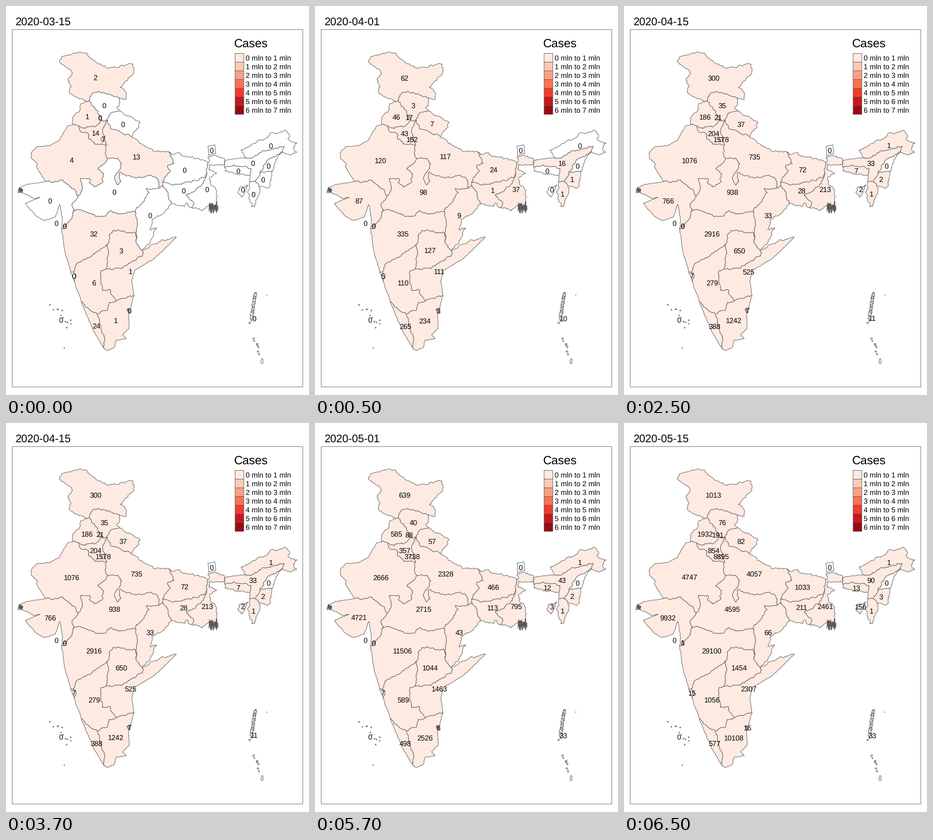
Animation of 660x849 px, one loop 8000 ms. Source, as a matplotlib script:

```python
import numpy as np
import matplotlib.pyplot as plt
from matplotlib.animation import FuncAnimation
from matplotlib.patches import Polygon, Rectangle

W, H, DPI = 660, 849, 100
INK = "#585858"
REDS = ["#feeae1", "#fdcab5", "#fc9f81", "#fb7252", "#ef3c2d", "#c8171c", "#980a13"]
DATES = ["2020-03-15", "2020-04-01", "2020-04-15", "2020-05-01", "2020-05-15"]

plt.rcParams.update({"font.family": "Liberation Sans", "text.hinting": "none"})
fig = plt.figure(figsize=(W / DPI, H / DPI), dpi=DPI, facecolor="white")
ax = fig.add_axes([0, 0, 1, 1])
ax.set(xlim=(0, W), ylim=(H, 0))
ax.axis("off")


def px(size):
    return size * 72 / DPI


def label(x, y, text, size, **kw):
    return ax.text(x, y, text, fontsize=px(size), color="black", zorder=5, **kw)


def box(x, y, w, h, **kw):
    ax.add_patch(Rectangle((x, y), w, h, lw=px(1), snap=False, **kw))


def arc(*xy, rough=0.28):
    """Line through key points, roughened by capped midpoint displacement."""
    pts = np.array(xy, float).reshape(-1, 2)
    rng = np.random.default_rng(int(pts.sum()))
    while True:
        step = np.diff(pts, axis=0)
        length = np.hypot(*step.T)
        split = length > 3.2
        if not split.any():
            return pts
        size = np.minimum(rough * length, 7 * rough) * rng.uniform(-1, 1, len(length))
        normal = np.column_stack([-step[:, 1], step[:, 0]]) / length[:, None]
        mid = (pts[:-1] + pts[1:]) / 2 + normal * size[:, None]
        pts = np.insert(pts, np.flatnonzero(split) + 1, mid[split], axis=0)


def coast(*xy):
    return arc(*xy, rough=0.1)


def gap(a, b):
    return np.hypot(*(a - b))


def ring(first, *rest):
    """Join arcs end to end, turning each one round where needed."""
    if rest:
        ends = rest[0][[0, -1]]
        if min(gap(first[0], e) for e in ends) < min(gap(first[-1], e) for e in ends):
            first = first[::-1]
    out = [first]
    for a in rest:
        tail = out[-1][-1]
        out.append(a[::-1] if gap(a[-1], tail) < gap(a[0], tail) else a)
    return np.vstack(out)


def shape(points):
    return ax.add_patch(Polygon(points, fc="white", ec=INK, lw=px(1), joinstyle="round", zorder=2))


def islet(x, y, w, h):
    t = np.linspace(0, 2 * np.pi, 14, endpoint=False)
    r = np.random.default_rng(int(x * 7 + y)).uniform(0.6, 1.1, 14) / 2
    return np.column_stack([x + w * r * np.cos(t), y + h * r * np.sin(t)])


def chain(start, end, n, spread, w, h, seed):
    """Islets scattered along a line, each with a random size up to w by h."""
    rng = np.random.default_rng(seed)
    centres = np.linspace(start, end, n) + rng.uniform(-spread, spread, (n, 2))
    return [islet(x, y, *rng.uniform(0.5, 1, 2) * (w, h)) for x, y in centres]


def creeks(x0, y0, x1, y1, n):
    """Tangle of up and down strokes for a marshy shore."""
    rng = np.random.default_rng(n)
    x = np.linspace(x0, x1, n) + rng.normal(0, 0.8, n)
    y = np.where(np.arange(n) % 2, y0, y1) + rng.uniform(-0.4, 0.4, n) * (y1 - y0)
    ax.plot(x, y, color=INK, lw=px(1), zorder=3)


regions = []


def region(x, y, counts, *arcs, islets=()):
    patches = [shape(p) for p in ([ring(*arcs)] if arcs else []) + list(islets)]
    regions.append((label(x, y + 5.4, "", 15.5, ha="center"), counts, patches))


# Northern borders
jk_out = arc(246, 200, 262, 203, 259, 187, 249, 177, 277, 149, 277, 127, 255, 130, 225, 136,
             190, 118, 177, 104, 158, 101, 121, 111, 118, 124, 145, 147, 135, 160, 142, 176,
             139, 190, 158, 201, 172, 206, 181, 207)
jk_hp = arc(181, 207, 190, 189, 206, 189, 246, 200)
hp_east = arc(246, 200, 247, 215, 241, 221, 247, 228)
hp_uk = arc(247, 228, 230, 233, 221, 250)
hp_hr = arc(221, 250, 209, 250)
hp_pb = arc(209, 250, 200, 235, 181, 207)
pb_west = arc(181, 207, 163, 213, 161, 222, 146, 242, 145, 259)
pb_rj = arc(145, 259, 159, 262)
pb_hr = arc(159, 262, 168, 266, 193, 264, 209, 250)
hr_rj = arc(159, 262, 161, 272, 179, 278, 182, 291, 192, 301, 218, 305)
hr_up = arc(221, 250, 211, 275, 218, 305)
uk_out = arc(247, 228, 278, 245, 292, 255, 273, 285)
up_uk = arc(221, 250, 228, 268, 273, 285)
up_north = arc(273, 285, 290, 299, 325, 318, 354, 318)

# Western and central borders
rj_west = coast(145, 259, 134, 262, 117, 292, 95, 305, 68, 307, 55, 320, 55, 332, 68, 344,
                66, 350, 87, 383)
rj_gj = arc(87, 383, 124, 380, 148, 400, 157, 416)
rj_mp = arc(225, 333, 200, 356, 213, 366, 209, 386, 192, 395, 181, 385, 183, 377, 163, 376,
            166, 398, 157, 416)
rj_up = arc(218, 305, 218, 328, 225, 333)
up_mp = arc(225, 333, 243, 332, 252, 345, 236, 377, 243, 391, 250, 384, 247, 364, 285, 375,
            316, 369, 331, 379, 335, 397)
up_cg = arc(335, 397, 342, 392)
up_jh = arc(342, 392, 341, 384)
gj_coast = coast(87, 383, 45, 389, 30, 396, 33, 406, 60, 420, 74, 418, 42, 431, 65, 458,
                 84, 468, 108, 460, 117, 433, 123, 467, 121, 487)
gj_mp = arc(157, 416, 144, 436, 147, 449)
gj_mh = arc(147, 449, 145, 462, 131, 478, 121, 487)
mp_mh = arc(147, 449, 158, 444, 199, 459, 219, 456, 227, 447, 255, 453, 282, 450)
mp_cg = arc(282, 450, 284, 440, 301, 426, 312, 407, 306, 398, 335, 397)

# Eastern borders
br_up = arc(341, 384, 358, 361, 352, 348, 366, 344, 354, 318)
br_north = arc(354, 318, 360, 325, 376, 320, 388, 328, 442, 341)
br_wb = arc(442, 341, 437, 367)
jh_br = arc(341, 384, 365, 391, 420, 380, 437, 367)
jh_wb = arc(404, 440, 409, 432, 392, 412, 412, 404, 430, 385, 437, 367)
jh_south = arc(360, 432, 390, 437, 393, 430, 404, 440)
cg_jh = arc(342, 392, 352, 405, 360, 432)
cg_east = arc(360, 432, 335, 458, 318, 466, 313, 488, 328, 484, 319, 505, 297, 534)
cg_mh = arc(282, 450, 286, 475, 283, 513)
cg_tg = arc(283, 513, 297, 534)
wb_out = arc(404, 440, 428, 447, 441, 435, 460, 447, 455, 396, 447, 392, 443, 377, 459, 365,
             442, 358, 443, 346, 476, 347, 477, 337, 456, 326, 440, 329, 442, 341)

# North-eastern borders
sk_out = coast(440, 306, 455, 303, 457, 322, 441, 326, 440, 306)
as_north = coast(477, 337, 505, 333, 524, 331)
ar_as = arc(524, 331, 536, 331, 562, 316, 606, 306, 602, 318)
ar_out = arc(602, 318, 620, 325, 633, 320, 626, 311, 634, 299, 615, 292, 618, 284, 610, 272,
             580, 276, 567, 288, 523, 309, 512, 314, 524, 331)
as_nl = arc(602, 318, 568, 338, 553, 364)
nl_out = arc(602, 318, 588, 335, 580, 360)
nl_mn = arc(580, 360, 553, 364)
mn_out = arc(580, 360, 578, 380, 570, 398, 551, 393)
mn_mz = arc(551, 393, 544, 384)
mn_as = arc(553, 364, 544, 384)
mz_as = arc(544, 384, 531, 383)
mz_out = arc(551, 393, 551, 412, 541, 438, 535, 438, 527, 404, 531, 383)
as_south = arc(531, 383, 531, 369)
as_ml = arc(476, 351, 498, 347, 534, 355, 531, 369)
ml_out = arc(476, 351, 477, 360, 505, 368, 531, 369)
tr_out = arc(527, 391, 509, 396, 505, 407, 513, 417, 527, 391)

# Southern borders
mh_coast = coast(121, 487, 127, 530, 141, 581)
mh_ga = arc(141, 581, 147, 581)
mh_ka = arc(147, 581, 153, 563, 188, 545, 221, 520)
mh_tg = arc(221, 520, 225, 503, 233, 490, 268, 494, 279, 493, 283, 513)
ga_ka = arc(147, 581, 153, 588, 149, 601)
ga_coast = coast(141, 581, 149, 601)
ka_coast = coast(149, 601, 164, 645)
ka_tg = arc(221, 520, 218, 574)
ap_ka = arc(218, 574, 207, 577, 206, 605, 210, 621, 227, 619, 228, 628, 240, 644)
ka_tn = arc(240, 644, 225, 647, 221, 664, 199, 673)
ka_kl = arc(164, 645, 179, 660, 199, 673)
tg_ap = arc(218, 574, 250, 573, 297, 546, 297, 534)
ap_north = arc(297, 534, 330, 518, 342, 511, 371, 504)
ap_coast = coast(371, 504, 340, 535, 318, 555, 281, 576, 274, 600, 279, 632)
ap_tn = arc(279, 632, 257, 638, 240, 644)
kl_coast = coast(164, 645, 192, 712, 214, 748)
kl_tn = arc(199, 673, 204, 690, 215, 725, 214, 748)
tn_coast = coast(214, 748, 221, 752, 236, 745, 240, 729, 262, 726, 254, 718, 268, 704,
                 268, 668, 279, 632)

region(195, 157, [2, 62, 300, 639, 1013], jk_out, jk_hp)
region(214, 217, [0, 3, 35, 40, 76], jk_hp, hp_east, hp_uk, hp_hr, hp_pb)
region(177, 242, [1, 46, 186, 585, 1932], hp_pb, pb_west, pb_rj, pb_hr)
region(255, 258, [0, 7, 37, 57, 82], uk_out, up_uk, hp_uk)
region(195, 278, [14, 43, 204, 357, 854], pb_hr, hp_hr, hr_up, hr_rj)
region(143, 337, [4, 120, 1076, 2666, 4747], pb_rj, rj_west, rj_gj, rj_mp, rj_up, hr_rj)
region(284, 329, [13, 117, 735, 2328, 4057], up_uk, up_north, br_up, up_jh, up_cg, up_mp, rj_up,
       hr_up)
region(389, 358, [0, 24, 72, 466, 1033], br_up, br_north, br_wb, jh_br)
region(448, 315, [0] * 5, sk_out)
region(538, 343, [0, 16, 33, 43, 90], as_north, ar_as, as_nl, mn_as, mz_as, as_south, as_ml)
region(577, 305, [0, 0, 1, 1, 1], ar_out, ar_as)
region(506, 360, [0, 0, 7, 12, 13], as_ml, ml_out)
region(572, 349, [0] * 5, as_nl, nl_out, nl_mn)
region(560, 379, [0, 1, 2, 2, 3], nl_mn, mn_out, mn_mz, mn_as)
region(539, 411, [0, 1, 1, 1, 1], mz_out, mz_as, mn_mz)
region(516, 401, [0, 0, 2, 3, 156], tr_out)
region(438, 400, [0, 37, 213, 795, 2461], wb_out, br_wb, jh_wb)
region(387, 403, [0, 1, 28, 113, 211], jh_br, jh_wb, jh_south, cg_jh, up_jh)
region(96, 425, [0, 87, 766, 4721, 9932], gj_coast, rj_gj, gj_mp, gj_mh)
region(236, 406, [0, 98, 938, 2715, 4595], rj_mp, up_mp, mp_cg, mp_mh, gj_mp)
region(314, 457, [0, 9, 33, 43, 66], mp_cg, up_cg, cg_jh, cg_east, cg_tg, cg_mh)
region(191, 497, [32, 335, 2916, 11506, 29100], mp_mh, cg_mh, mh_tg, mh_ka, mh_ga, mh_coast,
       gj_mh)
region(251, 534, [3, 127, 650, 1044, 1454], mh_tg, cg_tg, tg_ap, ka_tg)
region(271, 580, [1, 111, 525, 1463, 2307], tg_ap, ap_north, ap_coast, ap_tn, ap_ka)
region(192, 604, [6, 110, 279, 589, 1056], mh_ka, ka_tg, ap_ka, ka_tn, ka_kl, ka_coast, ga_ka)
region(148, 589, [0, 5, 7, 7, 15], mh_ga, ga_ka, ga_coast)
region(197, 699, [24, 265, 388, 498, 577], ka_kl, kl_tn, kl_coast)
region(239, 687, [1, 234, 1242, 2526, 10108], ka_tn, ap_tn, tn_coast, kl_tn)

# Small territories and islands
region(205, 244, [0, 17, 21, 88, 191], islets=[islet(205, 244, 6, 7)])
region(212, 291, [7, 152, 1578, 3738, 8895], islets=[islet(211, 292, 10, 11)])
region(110, 474, [0] * 5)
region(128, 480, [0, 0, 0, 0, 1], islets=chain((128, 478), (128, 483), 3, 1, 8, 7, 1))
region(269, 665, [0, 3, 7, 8, 16], islets=chain((266, 663), (269, 668), 5, 1, 6, 6, 2))
region(120, 685, [0] * 5, islets=chain((103, 657), (145, 697), 12, 9, 3, 3, 3)
       + [islet(127, 747, 2, 2)])
region(541, 682, [0, 10, 11, 33, 33],
       islets=chain((542, 629), (535, 678), 14, 1.5, 8, 16, 4)
       + chain((534, 685), (531, 692), 2, 1, 6, 8, 5)
       + chain((539, 727), (554, 757), 7, 3, 5, 5, 6)
       + [islet(558, 775, 6, 13), islet(568, 631, 1, 1)])

creeks(27, 397, 36, 405, 28)
creeks(442, 433, 460, 447, 46)

# Frame, heading and legend
box(13.5, 51.5, 633, 780, fill=False, ec="#666666")
heading = label(20.5, 42.3, "", 23.6)
label(497, 89.8, "Cases", 26)
for i, tint in enumerate(REDS):
    box(499, 103.5 + 19 * i, 19, 19, fc=tint, ec=INK)
    label(522, 118.8 + 19 * i, f"{i} mln to {i + 1} mln", 15.8)


def draw(frame):
    day = (frame + 3) // 4
    heading.set_text(DATES[day])
    for text, counts, patches in regions:
        text.set_text(str(counts[day]))
        for patch in patches:
            patch.set_facecolor(REDS[0] if counts[day] else "white")
    return []


anim = FuncAnimation(fig, draw, frames=16, interval=500, repeat=True, repeat_delay=0)
plt.show()
```
